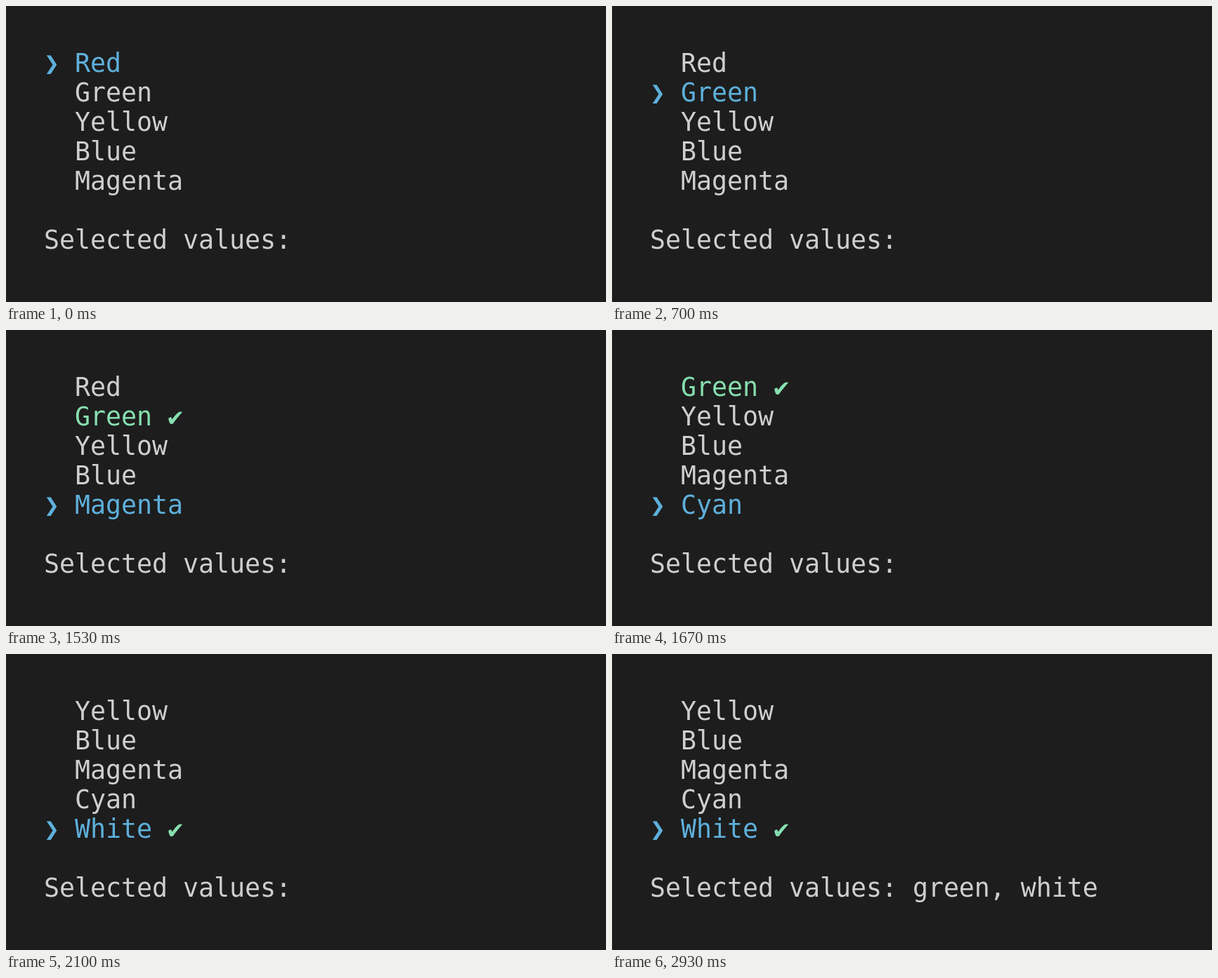
These frames come from a looping animation (854x422 px, 4.05 s). An HTML page with a canvas:

```html
<!DOCTYPE html>
<html lang="en">
<head>
<meta charset="utf-8">
<title>Multi-select list</title>
<style>
html, body { margin: 0; width: 100%; height: 100%; overflow: hidden; background: #1d1d1d; }
canvas { display: block; width: 854px; height: 422px; }
</style>
</head>
<body>
<canvas id="stage" width="854" height="422"></canvas>
<script>
const ctx = document.getElementById('stage').getContext('2d');

const LOOP = 4050;
const ITEMS = ['Red', 'Green', 'Yellow', 'Blue', 'Magenta', 'Cyan', 'White'];
const VISIBLE = 5;
const LEFT = 54, PITCH = 22, BASE = 94, LINE = 42;
const COLOR = { back: '#1d1d1d', edge: '#292929', text: '#cfcfcf', active: '#5eb0db', chosen: '#86dfb0' };

// Times at which the cursor moves down one item
const MOVES = [430, 1270, 1370, 1500, 1630, 1770];
// Item name -> time it gets ticked
const TICKS = { Green: 870, White: 2100 };
const SUBMIT = 2530;

function write(text, col, row, color) {
  ctx.fillStyle = color;
  ctx.fillText(text, LEFT + col * PITCH, BASE + row * LINE);
}

function draw(t) {
  const cursor = MOVES.filter(m => t >= m).length;
  const first = Math.max(0, cursor - VISIBLE + 1);
  const ticked = name => t >= TICKS[name];

  ctx.fillStyle = COLOR.back;
  ctx.fillRect(0, 0, 854, 422);
  ctx.fillStyle = COLOR.edge;
  ctx.fillRect(0, 0, 1, 422);

  // The monospace advance is 0.602 em
  ctx.font = `${PITCH / 0.602}px "DejaVu Sans Mono", monospace`;
  ctx.textBaseline = 'alphabetic';

  ITEMS.slice(first, first + VISIBLE).forEach((name, row) => {
    const active = first + row === cursor;
    const color = active ? COLOR.active : ticked(name) ? COLOR.chosen : COLOR.text;
    write(name, 2, row, color);
    if (active) write('❯', 0, row, COLOR.active);
    if (ticked(name)) write('✔', name.length + 3, row, COLOR.chosen);
  });

  const picked = ITEMS.filter(ticked).join(', ').toLowerCase();
  write('Selected values: ' + (t >= SUBMIT ? picked : ''), 0, 6, COLOR.text);
}

const start = performance.now();
function tick() {
  draw((performance.now() - start) % LOOP);
  requestAnimationFrame(tick);
}
tick();
</script>
</body>
</html>
```
